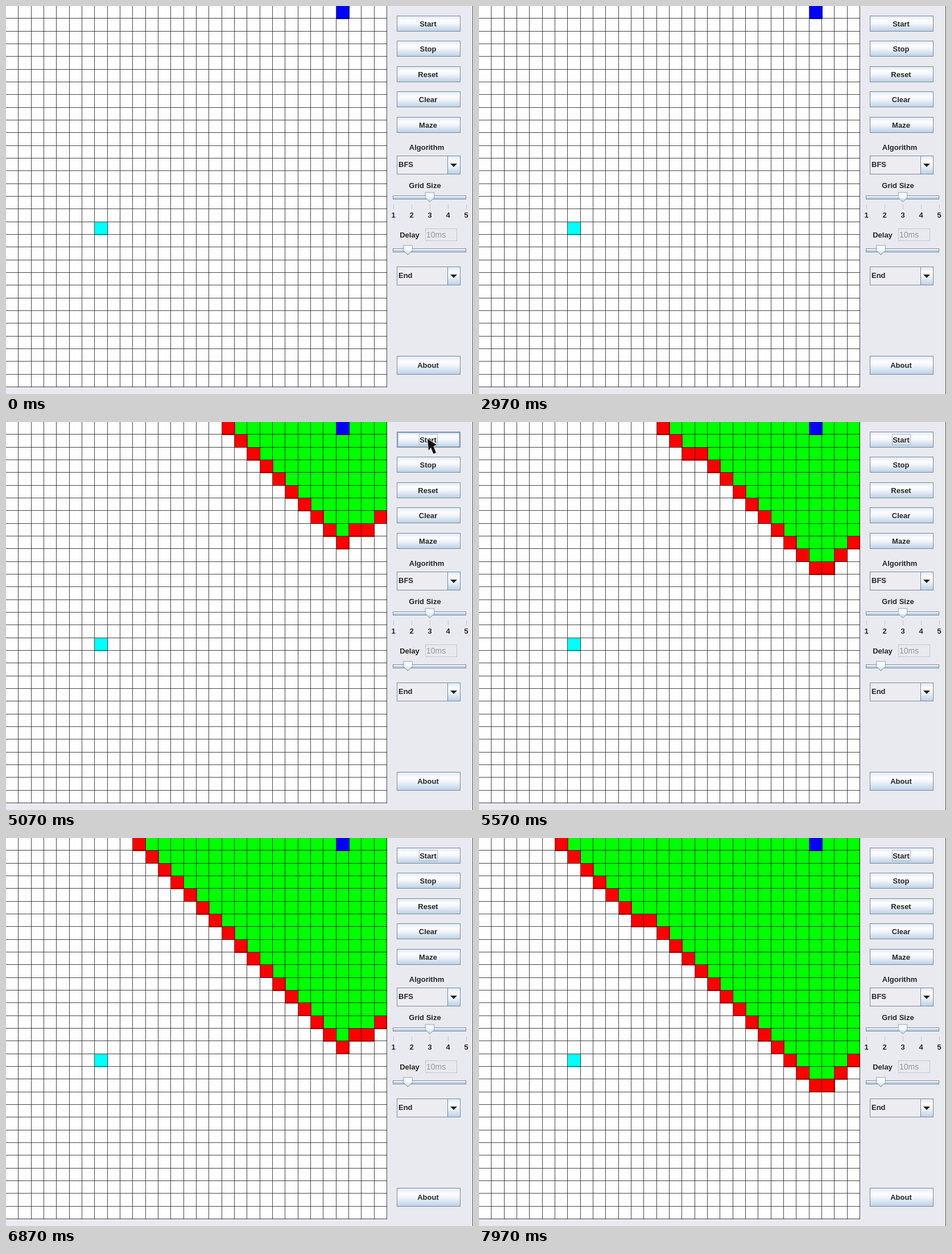
Write an HTML page with a canvas that moves like this. It is 821 by 682 pixels and loops after 8000 ms.

```html
<!DOCTYPE html>
<html lang="en">
<head>
<meta charset="utf-8">
<title>Breadth-first search</title>
<style>
html, body { margin: 0; width: 100%; height: 100%; overflow: hidden; background: #e9e9f0; }
canvas { display: block; }
</style>
</head>
<body>
<canvas id="stage" width="821" height="682"></canvas>
<script>
const ctx = document.getElementById('stage').getContext('2d');
const LOOP = 8000, SIZE = 30, CELL = 670 / SIZE;
const start = { col: 26, row: 0 }, end = { col: 7, row: 17 };
const EDGE = '#7a8a99', INK = '#262626';
const BUTTONS = ['Start', 'Stop', 'Reset', 'Clear', 'Maze'];

// Breadth-first visiting order; neighbours are tried right, left, down.
const order = [{ ...start, foundBy: 0 }];
const seen = new Set([start.col + start.row * SIZE]);
for (let i = 0; i < order.length; i++) {
  for (const [dx, dy] of [[1, 0], [-1, 0], [0, 1]]) {
    const col = order[i].col + dx, row = order[i].row + dy, key = col + row * SIZE;
    if (col < 0 || col >= SIZE || row >= SIZE || seen.has(key)) continue;
    seen.add(key);
    order.push({ col, row, foundBy: i });
  }
}

// Piecewise linear interpolation over [time, ...values] rows.
function along(keys, t) {
  if (t <= keys[0][0]) return keys[0].slice(1);
  for (let i = 1; i < keys.length; i++) {
    const [t0, ...a] = keys[i - 1], [t1, ...b] = keys[i];
    if (t < t1) return a.map((v, n) => v + (b[n] - v) * (t - t0) / (t1 - t0));
  }
  return keys[keys.length - 1].slice(1);
}

// Ticks are thirtieths of a second; values are the number of visited cells.
const PROGRESS = [[120, 0], [123, 6], [140, 43], [152, 68], [184, 133], [206, 180], [239, 250]];
const POINTER = [[3070, 768, 203], [3300, 757, 120], [3600, 741, 34], [3770, 741, 30],
                 [5270, 741, 30], [5480, 733, -30]];

function fill(color, x, y, w, h) {
  ctx.fillStyle = color;
  ctx.fillRect(x, y, w, h);
}

function outline(color, x, y, w, h) {
  ctx.strokeStyle = color;
  ctx.lineWidth = 1;
  ctx.strokeRect(x + .5, y + .5, w - 1, h - 1);
}

function label(text, x, y, align = 'center', font = 'bold 13px', color = INK) {
  ctx.font = font + ' "Liberation Sans", Arial, sans-serif';
  ctx.textAlign = align;
  ctx.textBaseline = 'alphabetic';
  ctx.fillStyle = color;
  ctx.fillText(text, x, y);
}

function polygon(points, color, edge) {
  ctx.beginPath();
  points.forEach(([x, y]) => ctx.lineTo(x, y));
  ctx.closePath();
  if (edge) {
    ctx.strokeStyle = edge;
    ctx.lineWidth = 1.2;
    ctx.stroke();
  }
  ctx.fillStyle = color;
  ctx.fill();
}

function glossy(y, h) {
  const g = ctx.createLinearGradient(0, y, 0, y + h);
  g.addColorStop(0, '#dde8f3');
  g.addColorStop(.3, '#fdfdff');
  g.addColorStop(.5, '#f3f6fb');
  g.addColorStop(1, '#b8cfe5');
  return g;
}

function button(text, y, h, { hover, pressed, focus } = {}) {
  fill(pressed ? '#b8cfe5' : glossy(y, h), 687, y, 112, h);
  outline(EDGE, 687, y, 112, h);
  if (hover) {
    outline('#8ea6be', 688, y + 1, 110, h - 2);
    outline('#b8cfe5', 689, y + 2, 108, h - 4);
  }
  if (focus) outline('#a3b8cc', 726, y + 4, 33, 20);
  label(text, 742, y + h / 2 + 4.5);
}

function combo(text, y) {
  fill('#ececf1', 687, y, 112, 33);
  fill(glossy(y, 33), 776, y, 23, 33);
  outline(EDGE, 687, y, 112, 33);
  outline(EDGE, 776, y, 23, 33);
  polygon([[781, y + 14], [793, y + 14], [787, y + 20]], '#222');
  label(text, 690, y + 20, 'left');
}

function slider(thumb, y) {
  fill('#f4f6fa', 680, y, 129, 7);
  fill('#b8cfe5', 681, y + 3, 127, 3);
  outline(EDGE, 680, y, 129, 7);
  polygon([[thumb - 7.5, y - 5], [thumb + 7.5, y - 5], [thumb + 7.5, y + 4],
           [thumb, y + 11], [thumb - 7.5, y + 4]], glossy(y - 6, 18), '#66788c');
}

function drawGrid(t) {
  const visited = Math.floor(along(PROGRESS, Math.floor((t + 4) * .03))[0] + 1e-6);
  const paint = (color, { col, row }) =>
    fill(color, Math.round(col * CELL), Math.round(row * CELL), 23, 23);
  fill('#fefefe', 0, 0, 670, 670);
  order.forEach((cell, i) => {
    if (i < visited) paint('#00ff00', cell);
    else if (cell.foundBy < visited && i) paint('#ff0000', cell);
  });
  paint('#0000ff', start);
  paint('#00ffff', end);
  for (let i = 1; i <= SIZE; i++) {
    const p = Math.round(i * CELL) - 1;
    fill('rgba(0,0,0,.72)', p, 0, 1, 670);
    fill('rgba(0,0,0,.72)', 0, p, 670, 1);
  }
}

function drawPanel(t, pointer) {
  fill('#e9e9f0', 670, 0, 151, 682);
  fill('#e9e9f0', 0, 670, 821, 12);
  fill('#555', 820, 0, 1, 682);
  BUTTONS.forEach((text, i) => {
    const y = Math.round(16.6 + i * 44.6);
    const hover = pointer && pointer[1] >= y && pointer[1] <= y + 28;
    const first = i === 0;
    button(text, y, 28, {
      hover,
      pressed: first && t >= 3870 && t < 4000,
      focus: first && t >= 3870
    });
  });
  label('Algorithm', 739.5, 253);
  combo('BFS', 263);
  label('Grid Size', 736.5, 320);
  slider(745, 333);
  for (let n = 1; n <= 5; n++) {
    const x = 649 + n * 32;
    fill('#c2c6d0', x, 349, 1, 8);
    label(n, x, 372);
  }
  label('Delay', 709.5, 407);
  outline('#bfc8d3', 737, 391, 56, 22);
  label('10ms', 739, 407, 'left', '14px', '#959595');
  slider(706.5, 426);
  combo('End', 458);
  button('About', 615, 33);
}

function drawPointer([x, y]) {
  polygon([[0, 0], [16, 10], [10.5, 12.5], [15, 24], [10.5, 26], [6, 15], [2, 20]]
    .map(([dx, dy]) => [x + dx, y + dy]), '#16120f', '#f5f5f5');
}

function draw(t) {
  const pointer = t >= 3070 && t < 5480 ? along(POINTER, t) : null;
  drawGrid(t);
  drawPanel(t, pointer);
  if (pointer) drawPointer(pointer);
}

const began = performance.now();
function tick() {
  draw((performance.now() - began) % LOOP);
  requestAnimationFrame(tick);
}
tick();
</script>
</body>
</html>
```
